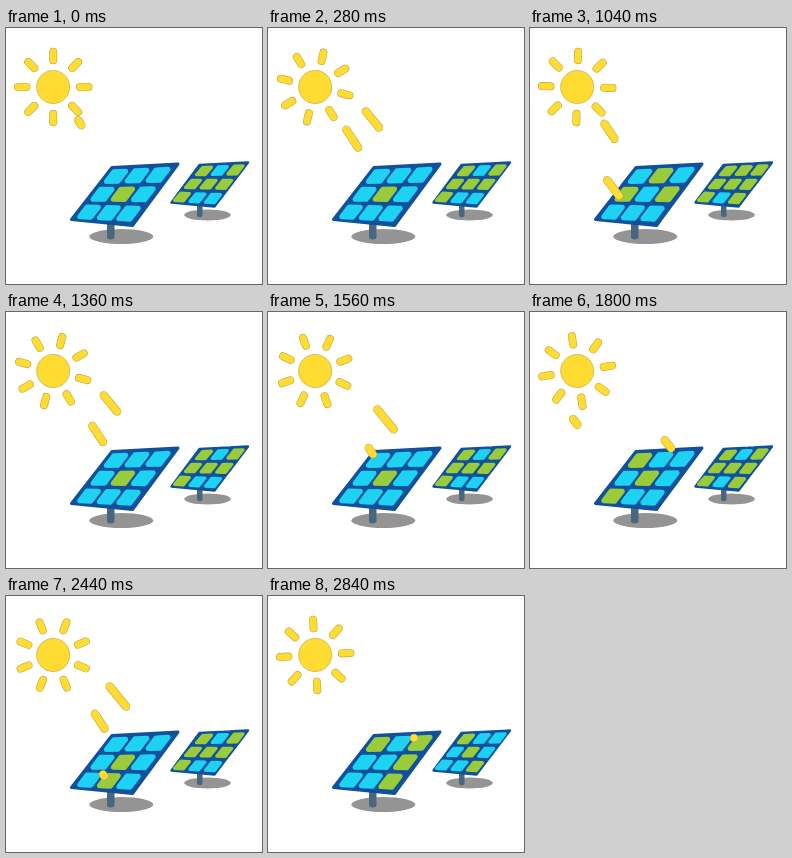
An HTML page for the animation above (2.88 s loop, 256 by 256 pixels).

```html
<!DOCTYPE html>
<html lang="en">
<head>
<meta charset="utf-8">
<title>Solar panels</title>
<style>
  html, body { margin: 0; width: 100%; height: 100%; overflow: hidden; background: #fff; }
  svg { display: block; width: 100%; height: 100%; }
</style>
</head>
<body>
<svg viewBox="0 0 256 256">
  <ellipse cx="115.3" cy="208.5" rx="32" ry="7.5" fill="#949494"/>
  <ellipse cx="201.5" cy="187" rx="23.3" ry="5.5" fill="#949494"/>
  <path d="M101 194h7.5v16q-3.75 3-7.5 0zM191 175h5.5v13q-2.75 2.5-5.5 0z" fill="#48677f"/>
  <g id="panels" stroke-linejoin="round"></g>
  <g id="sun" stroke-linecap="round">
    <circle r="16.6" fill="#fedc32" stroke="#c2a546" stroke-width=".6"/>
  </g>
  <g id="beams" stroke-linecap="round"></g>
</svg>
<script>
const LOOP = 2880, STEP = 40;
const SPIN = 1.935;     // degrees per pose
const PHASE = 10;       // poses between changes of the lit cells
const CYAN = '#1dd2f2', GREEN = '#9acb3b', BLUE = '#10509c';
const YELLOW = '#fedc32', RIM = '#c2a546';

// frame: corners of the board; grid: centres of the four corner cells;
// lit: green cells in each phase, counted row by row
const panels = [
  { frame: [[106, 139.5], [172, 136], [126.5, 197.5], [65.5, 191.5]],
    grid: [[110, 148.5], [152, 147], [122.5, 185.5], [83, 184]],
    edge: 3, round: 5,
    lit: ['4', '46', '135', '4', '046', '47', '0258'] },
  { frame: [[193.5, 137], [242, 134.5], [208.5, 178.5], [165.5, 174.5]],
    grid: [[198, 143], [229.5, 142], [207, 170.5], [176, 169]],
    edge: 2.4, round: 3.2,
    lit: ['023456', '0234568', '01234568', '023456', '0234568', '023456', '048'] }
];

// each beam flies from a to b in `life` poses, once per start
const beams = [
  { a: [95, 80], b: [146, 142], life: 17, starts: [3, 27, 51] },
  { a: [72, 92], b: [108, 147], life: 19, starts: [-1, 19, 45] },
  { a: [43, 107], b: [99, 181], life: 17, starts: [10.7, 41.3] }
];

const byId = id => document.getElementById(id);
const mix = (a, b, t) => a + (b - a) * t;
const between = (p, q, t) => [mix(p[0], q[0], t), mix(p[1], q[1], t)];

function add(parent, tag, attrs) {
  const el = document.createElementNS('http://www.w3.org/2000/svg', tag);
  for (const k in attrs) el.setAttribute(k, attrs[k]);
  return parent.appendChild(el);
}

// a round-ended bar with a thin rim
function addBar(parent, d, width) {
  return [[RIM, width + .6], [YELLOW, width - .6]].map(([stroke, w]) =>
    add(parent, 'path', { d, stroke, 'stroke-width': w }));
}

function addQuad(points, color, width) {
  return add(byId('panels'), 'polygon', {
    points: points.join(' '), fill: color, stroke: color, 'stroke-width': width
  });
}

function buildPanel(p) {
  const [tl, tr, br, bl] = p.grid;
  const at = (u, v) => between(between(tl, tr, u), between(bl, br, u), v);
  const h = .14;
  addQuad(p.frame, BLUE, p.edge);
  p.cells = [];
  for (let i = 0; i < 9; i++) {
    const u = (i % 3) / 2, v = Math.floor(i / 3) / 2;
    const corners = [at(u - h, v - h), at(u + h, v - h), at(u + h, v + h), at(u - h, v + h)];
    p.cells.push(addQuad(corners, CYAN, p.round));
  }
}

function drawPanel(p, pose) {
  const lit = p.lit[Math.floor(pose / PHASE)];
  p.cells.forEach((cell, i) => {
    const color = lit.includes(i) ? GREEN : CYAN;
    cell.setAttribute('fill', color);
    cell.setAttribute('stroke', color);
  });
}

function drawBeam(b, pose) {
  const start = b.starts.find(s => pose >= s && pose <= s + b.life);
  let d = '';
  if (start !== undefined) {
    const p = (pose - start) / b.life;
    const tail = between(b.a, b.b, p ** 2);
    const head = between(b.a, b.b, p ** .8);
    d = `M${tail}L${head}`;
  }
  b.bars.forEach(bar => bar.setAttribute('d', d));
}

function draw(ms) {
  const step = Math.floor((ms % LOOP) / STEP);
  // early on, every tenth step repeats the pose before it
  const pose = step - Math.min(3, Math.floor((step + 1) / 10));
  byId('sun').setAttribute('transform', `translate(47.2 59) rotate(${pose * SPIN})`);
  panels.forEach(p => drawPanel(p, pose));
  beams.forEach(b => drawBeam(b, pose));
}

panels.forEach(buildPanel);
for (let i = 0; i < 8; i++) {
  const ray = add(byId('sun'), 'g', { transform: `rotate(${i * 45})` });
  addBar(ray, 'M0-26.8V-35.3', 7.4);
}
beams.forEach(b => { b.bars = addBar(byId('beams'), '', 7.8); });

const t0 = performance.now();
function tick() {
  draw(performance.now() - t0);
  requestAnimationFrame(tick);
}
tick();
</script>
</body>
</html>
```
